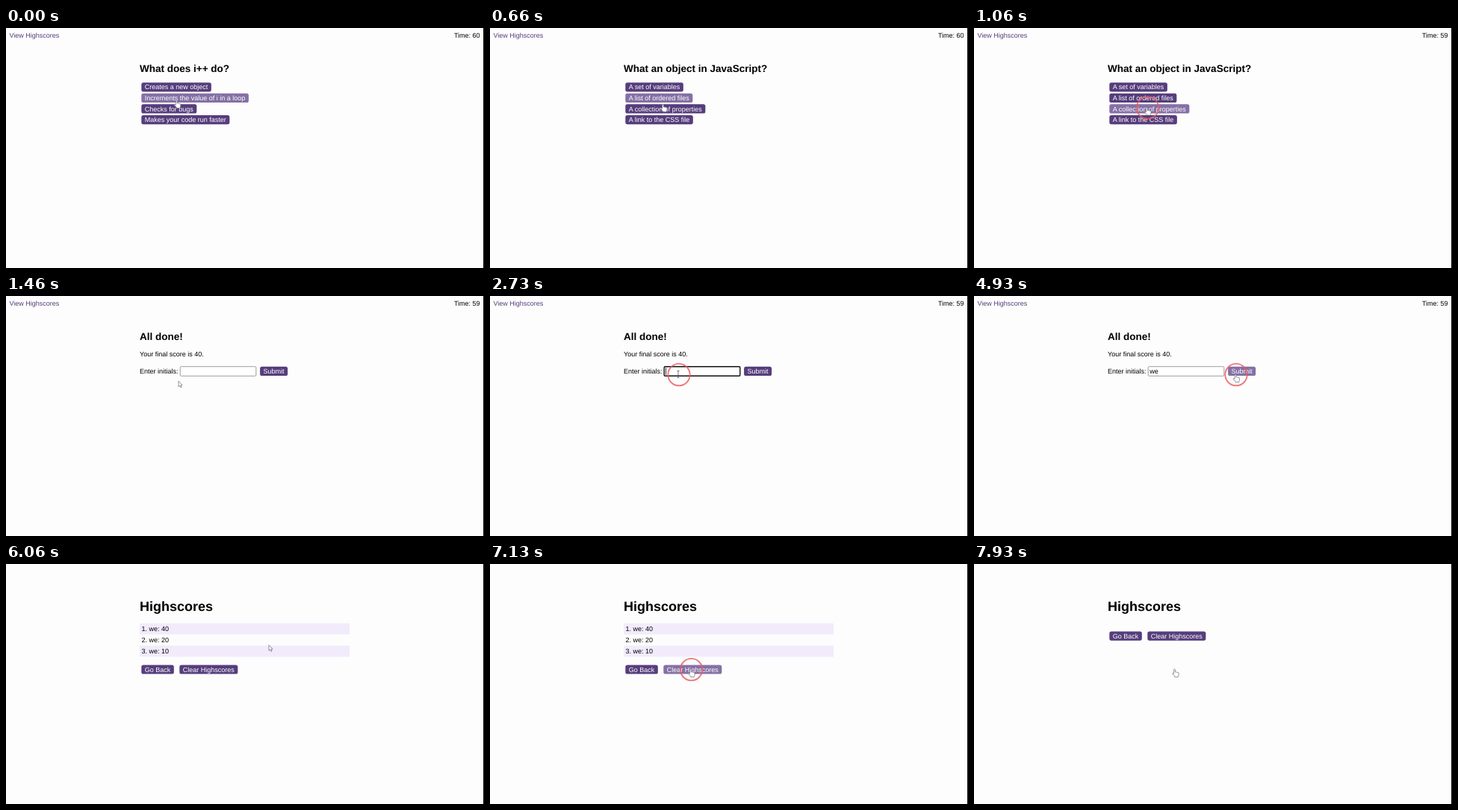
Write an HTML page that moves like this. It is 640 px wide and 322 px high and loops after 8 s.

```html
<!DOCTYPE html>
<html lang="en">
<head>
<meta charset="utf-8">
<title>Code quiz</title>
<style>
html, body { margin: 0; width: 100%; height: 100%; overflow: hidden; background: #fdfdfd; }
svg { display: block; width: 100%; height: 100%; }
text { font: 9px "Liberation Sans", Arial, sans-serif; text-rendering: geometricPrecision; white-space: pre; }
.h1 { font-size: 18px; font-weight: bold; }
.h2 { font-size: 13.5px; font-weight: bold; }
.link { fill: #563d7c; }
.button rect { fill: #563d7c; }
.button text { fill: #fff; }
.button.hover rect { fill: #8570a5; }
.cursor { fill: #fff; stroke: #66667a; stroke-width: .7; stroke-linejoin: round; }
</style>
</head>
<body>
<svg id="stage" viewBox="0 0 640 322"></svg>
<script>
const LOOP = 8000, LEFT = 179.1;
const stage = document.getElementById('stage');

function add(parent, tag, attrs = {}, content = '') {
  const el = document.createElementNS('http://www.w3.org/2000/svg', tag);
  for (const key in attrs) el.setAttribute(key, attrs[key]);
  el.textContent = content;
  return parent.appendChild(el);
}
const group = (parent = stage) => add(parent, 'g');
const label = (parent, x, y, content, cls = '') => add(parent, 'text', { x, y, class: cls }, content);
const show = (el, on) => el.setAttribute('visibility', on ? 'inherit' : 'hidden');

function button(parent, x, y, content) {
  const g = add(parent, 'g', { class: 'button' });
  const box = add(g, 'rect', { x, y, height: 12.2, rx: 2.6 });
  const text = label(g, x + 4.5, y + 9.2, content);
  box.setAttribute('width', text.getComputedTextLength() + 9);
  return g;
}
const hover = (el, on) => el.classList.toggle('hover', on);

function question(title, choices) {
  const g = group();
  label(g, LEFT, 59, title, 'h2');
  const buttons = choices.map((c, i) => button(g, 181.3, 73.2 + i * 14.58, c));
  return { g, buttons };
}

add(stage, 'rect', { width: 640, height: 322, fill: '#fdfdfd' });

// Header
const header = group();
label(header, 4.5, 12.7, 'View Highscores', 'link');
const timer = label(header, 634.6, 12.7, '');
timer.setAttribute('text-anchor', 'end');

// Quiz questions
const first = question('What does i++ do?', [
  'Creates a new object', 'Increments the value of i in a loop',
  'Checks for bugs', 'Makes your code run faster']);
const second = question('What an object in JavaScript?', [
  'A set of variables', 'A list of ordered files',
  'A collection of properties', 'A link to the CSS file']);

// Result form
const form = group();
label(form, LEFT, 59, 'All done!', 'h2');
label(form, LEFT, 81.2, 'Your final score is 40.');
label(form, LEFT, 103.9, 'Enter initials:');
const field = add(form, 'rect', { x: 233.2, y: 94.7, width: 101.6, height: 12.6, rx: 1.3, fill: '#fff' });
const initials = label(form, 235.2, 103.9, '');
const caret = add(form, 'rect', { y: 96.3, width: .8, height: 9.4 });
const submit = button(form, 340.1, 94.8, 'Submit');

// Highscores
const scores = group();
label(scores, LEFT, 63.2, 'Highscores', 'h1');
const list = group(scores);
[40, 20, 10].forEach((score, i) => {
  const y = 79.6 + i * 14.95;
  if (i % 2 === 0) add(list, 'rect', { x: LEFT, y, width: 281, height: 14.95, fill: '#f1ebfc' });
  label(list, 181.4, y + 10.4, `${i + 1}. we: ${score}`);
});
const actions = group(scores);
button(actions, 181.3, 135.4, 'Go Back');
const clear = button(actions, 232.3, 135.4, 'Clear Highscores');

// Pointer shapes, each with its hot spot at the origin
const pointer = group();
const shapes = {
  arrow: add(pointer, 'path', { class: 'cursor', d: 'M0 0V7.5L1.7 6 2.9 8.6 4 8.1 2.9 5.5H5.1Z' }),
  hand: add(pointer, 'path', {
    class: 'cursor',
    d: 'M-1 6.3V1a.9.9 0 0 1 1.8 0V4q1-.6 1.7.3 1-.5 1.6.3 1.4-.3 1.4 1V7.6q0 1.3-.8 2.2V10.6H.2V9.8L-2.9 6.5q-.2-1.2 1-.9Z'
  }),
  beam: add(pointer, 'path', { d: 'M-1.5-4.5H1.5M0-4.5V4.5M-1.5 4.5H1.5', stroke: '#444', 'stroke-width': .7 })
};
const ring = add(stage, 'circle', {
  r: 14.7, fill: 'none', stroke: '#ea5a5e', 'stroke-width': 1.9, 'stroke-opacity': .8
});
add(stage, 'rect', { x: 639, width: 1, height: 322, fill: '#111' });

// Pointer stops: time, x, y
const path = [
  [0, 228.3, 97], [400, 228.3, 97], [660, 231.5, 102], [860, 231.5, 106.5],
  [1260, 231.5, 106.5], [1400, 231, 114.2], [1730, 231, 114.2], [2200, 252, 105],
  [3530, 252, 105], [3660, 258.2, 123.7], [4130, 258.2, 123.7], [4330, 275, 126.5],
  [4730, 350, 105], [5260, 350, 105], [5330, 352, 108.7], [6060, 352, 108.7],
  [6660, 268.6, 141], [LOOP, 268.6, 141]
];
const modes = [[0, 'hand'], [1260, 'arrow'], [2060, 'beam'], [3600, 'arrow'],
  [4600, 'hand'], [5260, 'arrow'], [6530, 'hand']];
const clicks = [[60, 330], [930, 1260], [2730, 2860], [4800, 5260], [6730, 7400]];

function pointerAt(t) {
  const i = path.findIndex(stop => stop[0] > t);
  const [t0, x0, y0] = path[i - 1], [t1, x1, y1] = path[i];
  const u = (t - t0) / (t1 - t0), e = u * u * (3 - 2 * u);
  return [x0 + (x1 - x0) * e, y0 + (y1 - y0) * e];
}

function draw(t) {
  const within = (a, b) => t >= a && t < b;

  show(header, t < 5260);
  timer.textContent = 'Time: ' + (t < 1060 ? 60 : 59);
  show(first.g, t < 330);
  show(second.g, within(330, 1260));
  show(form, within(1260, 5260));
  show(scores, t >= 5260);

  hover(first.buttons[1], true);
  hover(second.buttons[1], t < 730);
  hover(second.buttons[2], t >= 730);
  hover(submit, t >= 4600);
  hover(clear, within(6530, 7400));

  const focused = within(2730, 4800);
  field.setAttribute('stroke', focused ? '#101010' : '#858585');
  field.setAttribute('stroke-width', focused ? 1.4 : .8);
  const typed = t < 3530 ? '' : t < 3800 ? 'w' : 'we';
  initials.textContent = typed;
  const blinkStart = t < 3530 ? 2730 : t < 3800 ? 3530 : 3800;
  caret.setAttribute('x', [235, 241.6, 246.4][typed.length]);
  show(caret, focused && Math.floor((t - blinkStart) / 530) % 2 === 0);

  show(list, t < 7400);
  actions.setAttribute('transform', `translate(0 ${t < 7400 ? 0 : -44.9})`);

  const [x, y] = pointerAt(t);
  const mode = modes.filter(m => m[0] <= t).pop()[1];
  pointer.setAttribute('transform', `translate(${x} ${y})`);
  for (const name in shapes) show(shapes[name], name === mode);
  ring.setAttribute('cx', x + 1);
  ring.setAttribute('cy', y + .6);
  show(ring, clicks.some(([a, b]) => within(a, b)));
}

const start = performance.now();
function tick() {
  const t = (performance.now() - start) % LOOP;
  draw(Math.floor((t + 7) * .015) / .015 % LOOP);
  requestAnimationFrame(tick);
}
tick();
</script>
</body>
</html>
```
